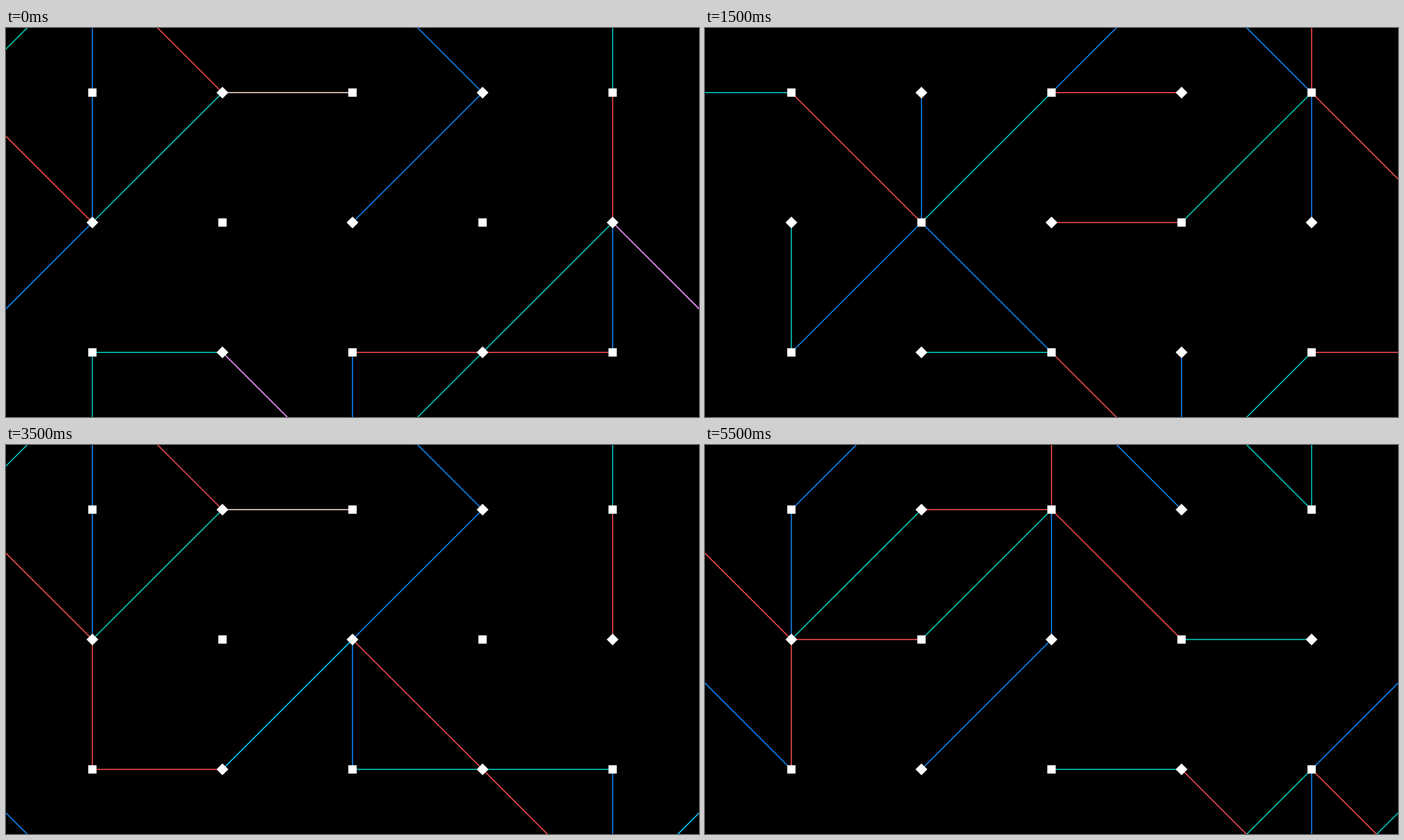
An HTML page that plays this animation: 998x561 px, repeating every 6 s.

```html
<!DOCTYPE html>
<html lang="en">
<head>
<meta charset="utf-8">
<title>Line lattice</title>
<style>
  html, body { margin: 0; width: 100%; height: 100%; overflow: hidden; background: #000; }
  svg { display: block; width: 998px; height: 561px; isolation: isolate; }
  .line { fill: none; stroke-width: 1.5; mix-blend-mode: lighten; }
</style>
</head>
<body>
<svg id="stage" viewBox="0 0 998 561">
  <rect width="998" height="561" fill="#000"/>
</svg>
<script>
const stage = document.getElementById('stage');
const GAP = 187.3, STEP = 500, HALF = 6;
const px = i => +(499 + (i - 2) * GAP).toFixed(2);
const py = j => +(280.5 + (j - 1) * GAP).toFixed(2);

function add(tag, attrs) {
  const el = document.createElementNS('http://www.w3.org/2000/svg', tag);
  for (const k in attrs) el.setAttribute(k, attrs[k]);
  stage.append(el);
  return el;
}

// Segments of one upward motif, relative to its hub: x1, y1, x2, y2.
const motif = {
  red: [[0, 0, -1, -1], [1, -1, 2, -1], [-4, -1, -4, -2], [5, -1, 6, -2]],
  teal: [[0, 0, 1, -1], [-1, -1, -2, -1], [4, -1, 4, -2], [-5, -1, -6, -2]],
  blue: [[0, 0, 0, -1], [2, -2, 3, -1], [-2, -2, -3, -1]]
};
const colors = { red: '#ff4d52', teal: '#00d2c6', blue: '#0a8cff' };

// Hub positions for each step of the first half.
const low = [[0, -1], [4, 1]], high = [[0, -2], [4, 0]];
const mid = [[1, 1], [3, 3]], spread = [[0, 0], [2, 2], [6, 4]];
const poses = [
  { up: [[0, 1], [2, 3]], down: low },
  { up: [[2, 1], [4, 3]], down: low },
  { up: mid, down: low },
  { up: mid, down: high },
  { up: spread, down: high },
  { up: spread, down: low }
];

const lines = {};
for (const c in colors) lines[c] = add('path', { class: 'line', stroke: colors[c] });

for (let j = 0; j < 3; j++) {
  for (let i = 0; i < 5; i++) {
    const x = px(i), y = py(j);
    add('rect', {
      x: x - 6, y: y - 6, width: 12, height: 12, fill: '#fff',
      transform: (i + j) % 2 ? `rotate(45 ${x} ${y})` : ''
    });
  }
}

const trace = (segs, [x, y], s) => segs.map(([a, b, c, d]) =>
  `M${px(x + s * a)} ${py(y + s * b)}L${px(x + s * c)} ${py(y + s * d)}`).join('');

// The second half repeats the first, turned by 180 degrees.
const turn = hubs => hubs.map(([x, y]) => [4 - x, 2 - y]);

function draw(step) {
  let { up, down } = poses[step % HALF];
  if (step >= HALF) [up, down] = [turn(down), turn(up)];
  for (const c in motif) {
    const d = up.map(h => trace(motif[c], h, 1))
      .concat(down.map(h => trace(motif[c], h, -1)));
    lines[c].setAttribute('d', d.join(''));
  }
}

let shown = -1;
const start = performance.now();
function tick() {
  const step = Math.floor((performance.now() - start) / STEP) % (2 * HALF);
  if (step !== shown) draw(shown = step);
  requestAnimationFrame(tick);
}
tick();
</script>
</body>
</html>
```
